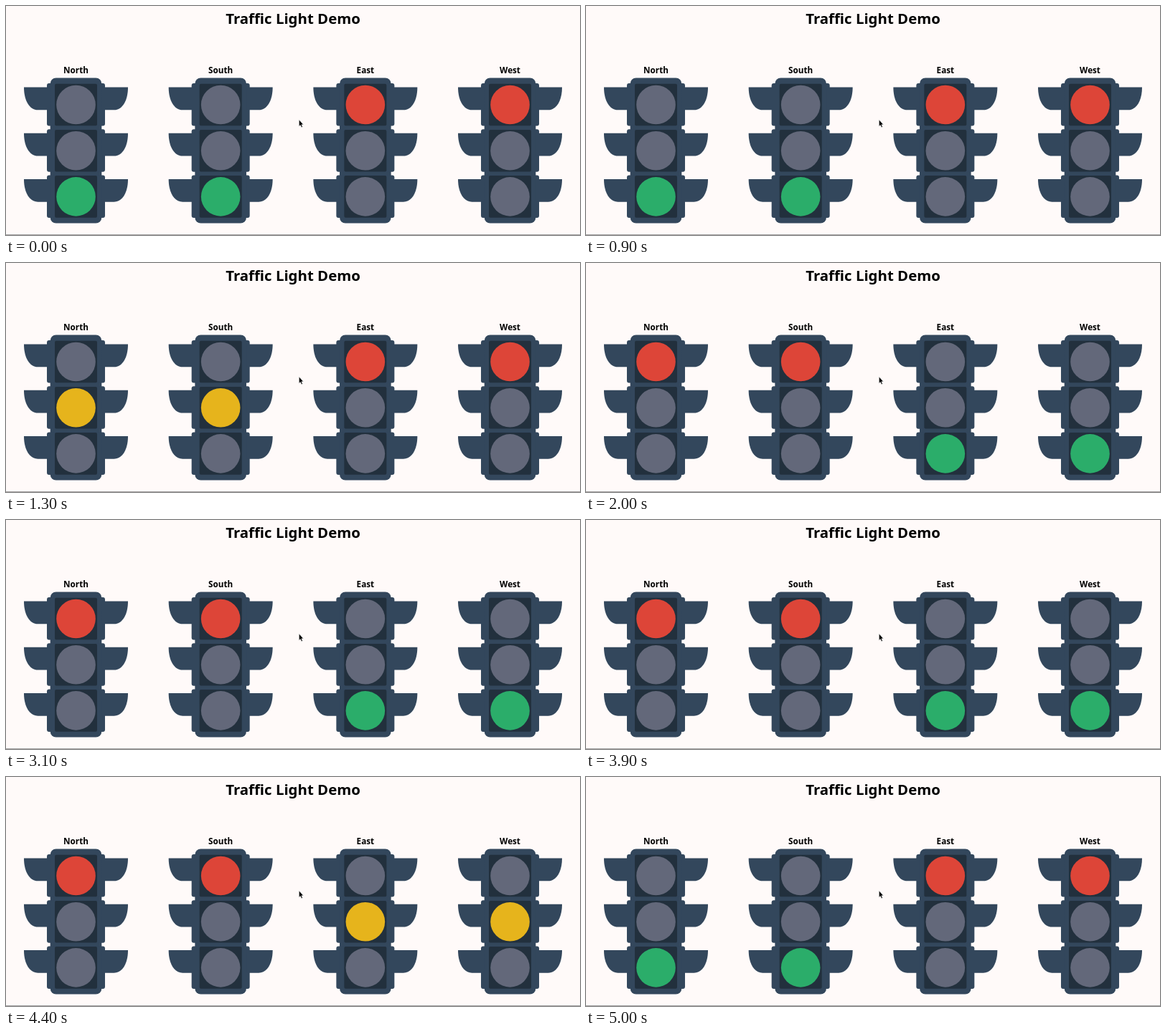
These frames come from a looping animation (800x320 px, 5100 ms). An HTML page:

```html
<!DOCTYPE html>
<html lang="en">
<head>
<meta charset="utf-8">
<title>Traffic Light Demo</title>
<style>
  html, body { margin: 0; width: 100%; height: 100%; overflow: hidden; background: #fffaf9; }
  svg { display: block; width: 800px; height: 320px; }
  text { font-family: "Noto Sans", "Open Sans", sans-serif; font-weight: 700; text-anchor: middle; font-variant-ligatures: none; }
</style>
</head>
<body>
<svg id="stage" viewBox="0 0 800 320">
  <defs>
    <g id="section">
      <rect x="-40.5" y="-30" width="81" height="59.5" rx="3"/>
      <path id="visor" d="M-72.5-24.5H-36V7.3H-53C-65 7.3-72.5-6-72.5-24.5Z"/>
      <use href="#visor" transform="scale(-1 1)"/>
      <rect x="-29.5" y="-29.3" width="59" height="58.6" rx="2" fill="#22303d"/>
    </g>
    <g id="housing" fill="#33475c">
      <rect x="-35.8" y="100.5" width="71.6" height="203" rx="8"/>
      <use href="#section" y="138"/>
      <use href="#section" y="202.2"/>
      <use href="#section" y="266.4"/>
    </g>
  </defs>
  <rect width="800" height="320" fill="#fffaf9"/>
  <text x="400" y="25.2" font-size="20.4">Traffic Light Demo</text>
  <g id="lights"></g>
  <path d="M408.3 158.8V168.2L410.3 166.4 411.8 169.8 413.4 169.1 412 165.8H414.6Z" fill="#000" stroke="#fff" stroke-width=".6"/>
  <rect y="319" width="800" height="1" fill="#a3a1a1"/>
</svg>
<script>
const LOOP = 5100;
const OFF = "#63687a";
const COLORS = ["#dd4538", "#e6b41c", "#2bad6a"];
const [RED, YELLOW, GREEN] = [0, 1, 2];

// Lit lamp for each road from the given time on
const phases = [
  { from: 0, northSouth: GREEN, eastWest: RED },
  { from: 1000, northSouth: YELLOW, eastWest: RED },
  { from: 1400, northSouth: RED, eastWest: GREEN },
  { from: 4100, northSouth: RED, eastWest: YELLOW },
  { from: 4500, northSouth: GREEN, eastWest: RED }
];

function add(parent, tag, attributes) {
  const node = document.createElementNS("http://www.w3.org/2000/svg", tag);
  for (const [key, value] of Object.entries(attributes)) node.setAttribute(key, value);
  return parent.appendChild(node);
}

function createLight(name, index) {
  const group = add(document.getElementById("lights"), "g", {
    transform: `translate(${97.5 + index * 201.67} 0)`
  });
  add(group, "text", { y: 94, "font-size": 11.7 }).textContent = name;
  add(group, "use", { href: "#housing" });
  const lamps = COLORS.map((_, i) => add(group, "circle", { cy: 138 + i * 64.2, r: 27.3 }));
  return { lamps, road: index < 2 ? "northSouth" : "eastWest" };
}

const lights = ["North", "South", "East", "West"].map(createLight);

function render(time) {
  const phase = phases.findLast(({ from }) => time >= from);
  for (const { lamps, road } of lights) {
    lamps.forEach((lamp, i) => lamp.setAttribute("fill", phase[road] === i ? COLORS[i] : OFF));
  }
}

const start = performance.now();
function tick() {
  render((performance.now() - start) % LOOP);
  requestAnimationFrame(tick);
}
tick();
</script>
</body>
</html>
```
